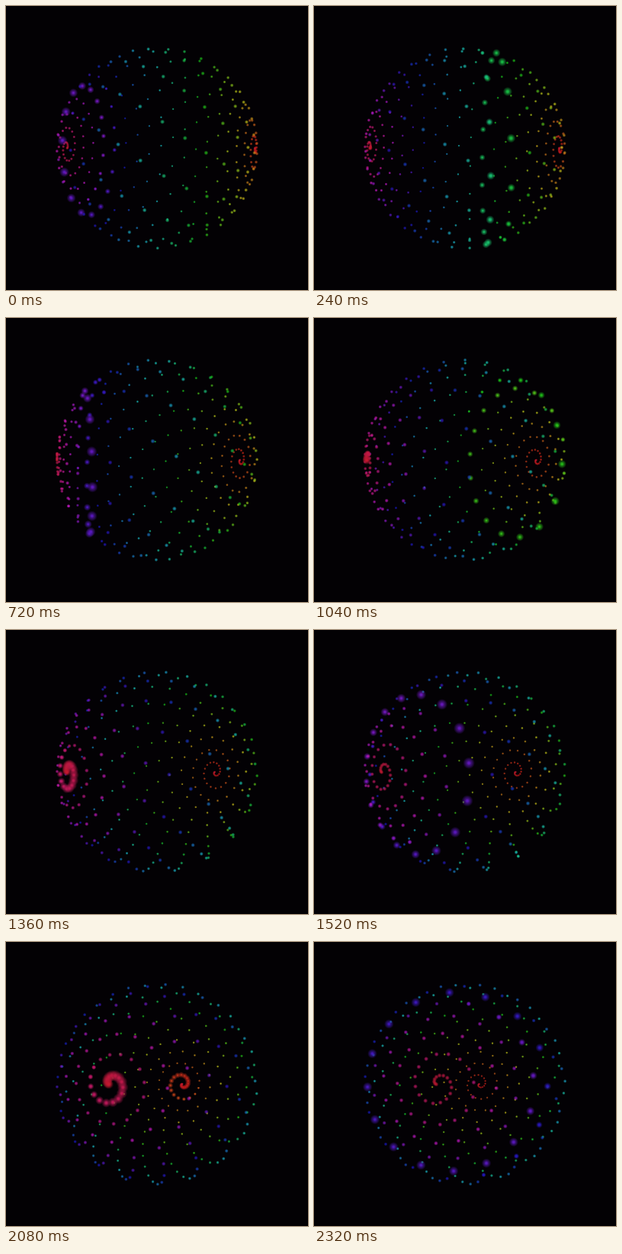
Animation, 396 px wide and 372 px high, one loop 2400 ms. Source, as an HTML page with a canvas:

```html
<!DOCTYPE html>
<html lang="en">
<head>
<meta charset="utf-8">
<title>Spiral sphere</title>
<style>
  html, body { margin: 0; width: 100%; height: 100%; overflow: hidden; background: #030104; }
  canvas { display: block; }
</style>
</head>
<body>
<canvas id="stage" width="396" height="372"></canvas>
<script>
const ctx = document.getElementById('stage').getContext('2d');
const W = 396, H = 372;
const LOOP = 2400, STEP = 80;
const COUNT = 300;        // dots from the right pole to the left pole
const TWIST = 0.4;        // radians around the axis per dot
const SCALE = 124.4, DEPTH = 0.32;
const REACH = 12;         // half width of a pulse, in dots

// Rotation about the vertical axis: [step, degrees]
const spin = [[0, -7.5], [9, 17], [22, 58], [29, 78.6]];

// Each pulse runs along the spiral: [step, dot index]
const pulses = [
  [[-2, 290], [0, 228], [3, 125], [8, -20]],
  [[2.5, 311], [6.5, 290], [9, 225], [13, 97], [17, -20]],
  [[11.5, 308], [17, 291], [22, 136], [27, -20]],
  [[22.5, 311], [26.5, 290], [29, 220], [31, 160]]
];

function along(keys, n) {
  for (let k = 1; k < keys.length; k++) {
    const [n0, p0] = keys[k - 1], [n1, p1] = keys[k];
    if (n >= n0 && n <= n1) return p0 + (p1 - p0) * (n - n0) / (n1 - n0);
  }
  return -1000;
}

function glow(d, radius, hue, light, alpha) {
  const r = radius * d.s;
  const tone = a => `hsla(${hue}, 78%, ${light}%, ${a})`;
  const fill = ctx.createRadialGradient(d.x, d.y, 0, d.x, d.y, r);
  fill.addColorStop(0, tone(alpha));
  fill.addColorStop(0.5, tone(alpha * 0.65));
  fill.addColorStop(1, tone(0));
  ctx.fillStyle = fill;
  ctx.fillRect(d.x - r, d.y - r, 2 * r, 2 * r);
}

function project(i, turn) {
  const theta = Math.PI * i / COUNT;
  const psi = Math.PI + TWIST * i;
  const axis = Math.cos(theta), ring = Math.sin(theta);
  const side = ring * Math.cos(psi);
  const x = axis * Math.cos(turn) + side * Math.sin(turn);
  const z = side * Math.cos(turn) - axis * Math.sin(turn);
  const s = 1 / (1 - DEPTH * z);
  return { i, z, s, x: W / 2 + SCALE * s * x, y: H / 2 - SCALE * s * ring * Math.sin(psi) };
}

function drawDot(d, heads) {
  const hue = 360 * d.i / COUNT - 7;
  const gap = Math.min(...heads.map(head => Math.abs(d.i - head)));
  const power = Math.max(0, 1 - (gap / REACH) ** 2);
  if (power > 0) glow(d, 2 + 3.3 * power, hue, 40, 0.85);
  glow(d, 2.1, hue, 44, 0.85);
}

function draw(n) {
  const turn = along(spin, n) * Math.PI / 180;
  const heads = pulses.map(keys => along(keys, n));
  ctx.fillStyle = '#030104';
  ctx.fillRect(0, 0, W, H);
  const dots = [];
  for (let i = 0; i < COUNT; i++) dots.push(project(i, turn));
  dots.sort((a, b) => a.z - b.z);
  for (const d of dots) drawDot(d, heads);
}

const start = performance.now();
function frame() {
  const t = Math.max(0, performance.now() - start) % LOOP;
  draw(Math.floor(t / STEP));
  requestAnimationFrame(frame);
}
frame();
</script>
</body>
</html>
```
